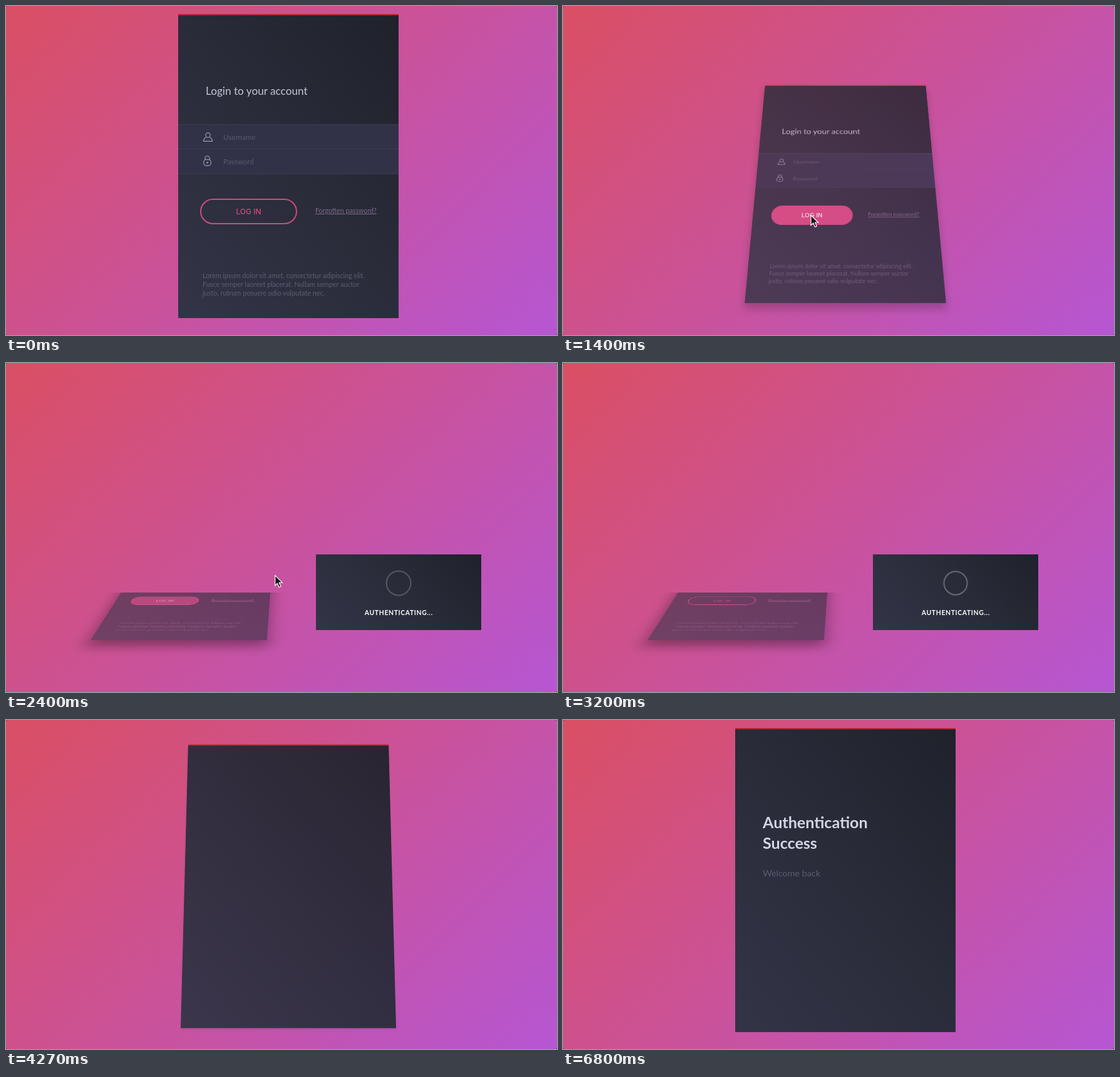
Recreate the animation shown at these times as an HTML page. Size 880 px wide and 526 px high, loop 6.87 s.

```html
<!DOCTYPE html>
<html lang="en">
<head>
<meta charset="utf-8">
<title>Login</title>
<style>
  html, body { margin: 0; width: 100%; height: 100%; overflow: hidden; background: #7c3350; }
  #stage {
    position: relative; width: 880px; height: 526px; overflow: hidden; border-radius: 3px;
    background: linear-gradient(135deg, #da4f63, #ca529a 50%, #b656d3);
    font-family: Lato, "Open Sans", sans-serif;
  }
  #space { position: absolute; inset: 0; perspective: 880px; perspective-origin: 451px 268px; }
  #card, #auth { position: absolute; background: linear-gradient(230deg, #1f212b, #2a2c3a 50%, #333447); }
  #card { left: 275px; top: 13px; width: 352px; height: 486px; transform-origin: 176px 100%; }
  #auth { left: 0; top: 306px; width: 264px; height: 121px; }
  svg { position: absolute; left: 0; top: 0; display: block; }
  .icon { fill: none; stroke: #8d8b9f; stroke-width: 1.4; }
  .hint { font-size: 11.6px; fill: #5b576c; }
  .small { font-size: 10.8px; fill: #605d71; }
</style>
</head>
<body>
<div id="stage">
  <div id="space">
    <div id="card">
      <svg width="352" height="486" viewBox="275 13 352 486">
        <rect x="275" y="13" width="352" height="2" fill="#a9262e"/>
        <g id="form">
          <text x="319" y="142" font-size="17.2" fill="#c5c5d5">Login to your account</text>
          <rect x="275" y="189" width="352" height="80" fill="#313248"/>
          <path d="M275 189.5h352M275 228.5h352M275 268.5h352" stroke="#3b3c51"/>
          <g class="icon">
            <circle cx="322.5" cy="206.5" r="3.7"/>
            <path d="M319.5 209.8q-3.8 2-4 6.4h14q-.2-4.400-4-6.400"/>
            <path d="M317.700 246v-2.300a3.800 3.800 0 0 1 7.600 0v2.300"/>
            <rect x="315.700" y="245.500" width="11.600" height="9.800" rx="4"/>
            <circle cx="321.500" cy="250.300" r=".8"/>
          </g>
          <text class="hint" x="347" y="214">Username</text>
          <text class="hint" x="347" y="253">Password</text>
          <rect id="button" x="311" y="309" width="153" height="39" rx="19.5" fill="#d84a80" stroke="#d04a80" stroke-width="2"/>
          <text id="label" x="387.5" y="332.700" text-anchor="middle" font-size="12" font-weight="500" font-family="Inter, sans-serif">LOG IN</text>
          <text x="494" y="331" font-size="10.700" fill="#7a6a87" text-decoration="underline">Forgotten password?</text>
          <text class="small" x="314" y="435">Lorem ipsum dolor sit amet, consectetur adipiscing elit.</text>
          <text class="small" x="314" y="449">Fusce semper laoreet placerat. Nullam semper auctor</text>
          <text class="small" x="314" y="463">justo, rutrum posuere odio vulputate nec.</text>
        </g>
        <g id="success">
          <g font-size="25.100" font-weight="700" fill="#d3d5e5">
            <text x="319" y="173">Authentication</text>
            <text x="319" y="206">Success</text>
          </g>
          <text x="319" y="250" font-size="14.300" fill="#5f5b71">Welcome back</text>
        </g>
      </svg>
    </div>
  </div>
  <div id="auth">
    <svg width="264" height="121" fill="none" stroke="#fff" stroke-width="2.2">
      <circle class="ring" cx="132" cy="46"/>
      <circle class="ring" cx="132" cy="46"/>
      <text x="132.300" y="97" text-anchor="middle" font-size="10.400" font-weight="700" letter-spacing=".65" fill="#fff" stroke="none">AUTHENTICATING...</text>
    </svg>
  </div>
  <svg width="880" height="526">
    <path id="cursor" d="M0 0v16l3.700-3.500 2.700 6.300 2.800-1.200-2.700-6.100h5z" fill="#111" stroke="#fff" stroke-width="1.200"/>
  </svg>
</div>
<script>
const LOOP = 6870;
const TILT = 1150, SLIDE = 1440, SHOW = 1645, HIDE = 3600, UNTILT = 3895, WELCOME = 4300;

const $ = id => document.getElementById(id);
const rings = document.querySelectorAll('.ring');
const clamp = v => Math.min(1, Math.max(0, v));
const span = (t, start, length) => clamp((t - start) / length);
const mix = (a, b, p) => a + (b - a) * p;
const swing = p => 0.5 - Math.cos(p * Math.PI) / 2;
const outQuint = p => 1 - (1 - p) ** 5;

function bezier(x1, y1, x2, y2) {
  const at = (a, b, s) => 3 * (1 - s) ** 2 * s * a + 3 * (1 - s) * s * s * b + s ** 3;
  return x => {
    if (x <= 0 || x >= 1) return clamp(x);
    let lo = 0, hi = 1;
    for (let i = 0; i < 24; i++) {
      const mid = (lo + hi) / 2;
      if (at(x1, x2, mid) < x) lo = mid; else hi = mid;
    }
    return at(y1, y2, lo);
  };
}
const flip = bezier(0.68, -0.25, 0.265, 0.85);
const grow = bezier(0.165, 0.84, 0.44, 1);
const fade = bezier(0.3, 0.61, 0.355, 1);

// Goes 0 to 1 at one time and back at a later one.
const thereAndBack = (t, out, back) =>
  t < back ? flip(span(t, out, 500)) : 1 - flip(span(t, back, 500));

function drawCard(t) {
  const tilt = thereAndBack(t, TILT, UNTILT);
  const slide = thereAndBack(t, SLIDE, HIDE);
  const card = $('card');
  card.style.transform =
    `translate(${-175 * slide}px, ${-56 * tilt}px) rotateX(${70 * tilt}deg) scale(${1 - 0.2 * tilt})`;
  card.style.opacity = clamp(1 - 0.4 * tilt);
  const s = Math.max(0, tilt);
  card.style.boxShadow = `0 ${22 * s}px ${33 * s}px ${3.3 * s}px rgba(0,0,0,${0.55 * clamp(s)})`;
  // The far half of the card is hidden while the panel is showing.
  $('space').style.clipPath = t >= SHOW && t < HIDE + 200 ? 'inset(367px 0 0 0)' : 'none';

  $('form').style.opacity = 1 - swing(span(t, UNTILT, 123));
  $('success').style.opacity = swing(span(t, WELCOME, 400));
}

function drawButton(t) {
  const hover = span(t, 680, 200) - span(t, 2350, 200);
  $('button').style.fillOpacity = hover;
  $('label').style.fill = `rgb(${mix(224, 255, hover)},${mix(68, 255, hover)},${mix(127, 255, hover)})`;
}

function drawPanel(t) {
  const out = outQuint(span(t, SHOW, 600)) - outQuint(span(t, HIDE, 600));
  $('auth').style.transform = `translateX(${mix(270, 495, out)}px)`;
  $('auth').style.opacity = swing(span(t, SHOW, 200)) - swing(span(t, HIDE, 200));
  rings.forEach((ring, i) => {
    const phase = ((t - 1625 + 3600) / 1800 + i / 2) % 1;
    ring.setAttribute('r', 1.1 * mix(1, 20, grow(phase)));
    ring.style.strokeOpacity = 1 - fade(phase);
  });
}

function drawCursor(t) {
  const away = 1 - swing(span(t, 200, 560)) + swing(span(t, 2300, 600));
  $('cursor').setAttribute('transform', `translate(${mix(396, 890, away)} ${mix(334.5, 410, away)})`);
}

function draw(t) {
  drawCard(t);
  drawButton(t);
  drawPanel(t);
  drawCursor(t);
}

const start = performance.now();
function tick() {
  draw((performance.now() - start) % LOOP);
  requestAnimationFrame(tick);
}
tick();
</script>
</body>
</html>
```
